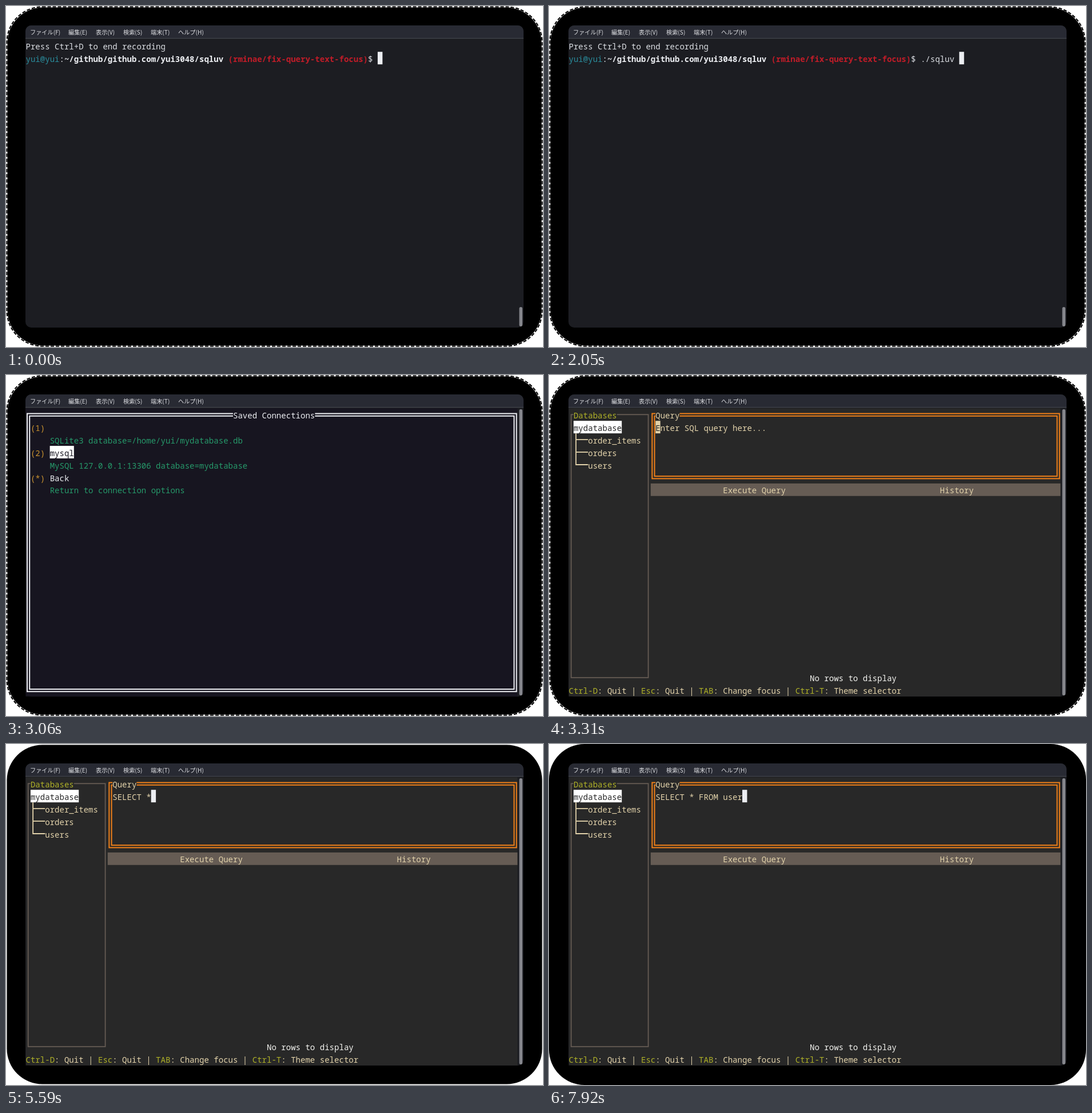
An HTML page with a canvas for the animation above (8 s loop, 939 by 597 pixels).

```html
<!DOCTYPE html>
<html lang="ja">
<head>
<meta charset="utf-8">
<title>Terminal</title>
<style>
html, body { margin: 0; width: 100%; height: 100%; overflow: hidden; background: #fff; }
canvas { display: block; }
</style>
</head>
<body>
<canvas id="stage" width="939" height="597"></canvas>
<script>
const ctx = document.getElementById('stage').getContext('2d');
const LOOP = 8000;
const COL = 8.43, ROW = 21.93, LEFT = 34.5, TOP = 58.3;
const COLS = 102, ROWS = 23;
const SHELL = '#1c1d22', WHITE = '#eceef2', GREEN = '#26996a', AMBER = '#c9922f';
const DARK = '#282828', SAND = '#e2d2aa', BROWN = '#665c54', ORANGE = '#f08019', LIME = '#aeb027';
const MONO = '14.05px "Noto Sans Mono", monospace';

// Moments at which the screen is refreshed
const TICKS = [0, 250, 520, 770, 1020, 1280, 1530, 1790, 2050, 2300, 2550, 2810, 3060, 3310, 3560, 3810,
  4060, 4310, 4570, 4820, 5080, 5330, 5590, 5840, 6100, 6360, 6620, 6880, 7140, 7400, 7660, 7920];
const MENU = [['ファイル(F)', 42], ['編集(E)', 109], ['表示(V)', 157], ['検索(S)', 205], ['端末(T)', 253], ['ヘルプ(H)', 301]];
const QUERY = 'SELECT * FROM user';

const colX = c => LEFT + c * COL;
const rowY = r => TOP + r * ROW;
const midX = c => colX(c + 0.5);
const midY = r => rowY(r + 0.5);

function rect(x, y, w, h, color) {
  ctx.fillStyle = color;
  ctx.fillRect(x, y, w, h);
}

function cells(c, r, n, color) {
  rect(colX(c), rowY(r), n * COL, ROW, color);
}

// Writes on the character grid and returns the next column
function write(c, r, text, color, bold) {
  ctx.font = (bold ? 'bold ' : '') + MONO;
  ctx.fillStyle = color;
  for (const ch of text) {
    if (ch !== ' ') ctx.fillText(ch, colX(c), rowY(r) + 17.6);
    c++;
  }
  return c;
}

function label(c, r, text, color, back) {
  cells(c, r, text.length, back);
  write(c, r, text, color);
}

function line(points, color) {
  ctx.strokeStyle = color;
  ctx.lineWidth = 1.8;
  ctx.beginPath();
  points.forEach(([x, y]) => ctx.lineTo(x, y));
  ctx.stroke();
}

function box(c0, r0, c1, r1, color) {
  ctx.strokeStyle = color;
  ctx.lineWidth = 1.8;
  ctx.strokeRect(midX(c0), midY(r0), midX(c1) - midX(c0), midY(r1) - midY(r0));
}

function doubleBox(c0, r0, c1, r1, color) {
  ctx.strokeStyle = color;
  ctx.lineWidth = 2;
  for (const d of [2.1, -2.1]) {
    const x = midX(c0) + 0.4 - d, y = midY(r0) + 0.4 - d;
    ctx.strokeRect(x, y, (c1 - c0) * COL + 2 * d, (r1 - r0) * ROW + 2 * d);
  }
}

function screen(color) {
  rect(LEFT, TOP, COLS * COL, ROWS * ROW, color);
}

function rounded(x, y, w, h, radius) {
  ctx.beginPath();
  ctx.roundRect(x, y, w, h, radius);
}

// The edge starts ragged, then turns smooth and spreads to the stage border
function backdrop(t) {
  const ragged = t < 5590;
  const inset = ragged ? 2.5 : t < 6880 ? 1.5 : 0;
  rect(0, 0, 939, 597, '#fff');
  ctx.fillStyle = '#000';
  rounded(inset, inset, 939 - 2 * inset, 597 - 2 * inset, 62);
  ctx.fill();
  if (!ragged) return;
  ctx.setLineDash([6, 3]);
  ctx.strokeStyle = '#000';
  ctx.lineWidth = 2;
  rounded(1.5, 1.5, 936, 594, 62);
  ctx.stroke();
  ctx.setLineDash([]);
}

function frameWindow() {
  rounded(34, 34, 871, 529, 10);
  ctx.fillStyle = SHELL;
  ctx.fill();
  rounded(34, 34, 871, 22.5, [10, 10, 0, 0]);
  ctx.fillStyle = '#282a33';
  ctx.fill();
  rect(34, 56, 871, 1.2, '#44464d');
  ctx.font = '10.2px "Noto Sans CJK JP", "Noto Sans CJK", sans-serif';
  ctx.fillStyle = '#dfe0e4';
  for (const [text, x] of MENU) ctx.fillText(text, x, 49.7);
}

function scrollbar(y) {
  rounded(897.5, y, 5.5, 561 - y, 2.7);
  ctx.fillStyle = '#85868c';
  ctx.fill();
}

function shell(command, cursor) {
  write(0, 0, 'Press Ctrl+D to end recording', '#dcdfe4');
  let c = write(0, 1, 'yui@yui', '#2a8c9c');
  c = write(c, 1, ':', WHITE);
  c = write(c, 1, '~/github/github.com/yui3048/sqluv', WHITE, true);
  c = write(c + 1, 1, '(rminae/fix-query-text-focus)', '#c01c28', true);
  c = write(c, 1, '$ ' + command, '#dcdfe4');
  if (cursor) cells(c, 1, 1, WHITE);
  scrollbar(527);
}

function connections(selected) {
  const back = '#171520';
  screen(back);
  doubleBox(0, 0, 101, 22, WHITE);
  label(43, 0, 'Saved Connections', WHITE, back);
  const items = [
    ['(1)', '', 'SQLite3 database=/home/yui/mydatabase.db'],
    ['(2)', 'mysql', 'MySQL 127.0.0.1:13306 database=mydatabase'],
    ['(*)', 'Back', 'Return to connection options']
  ];
  items.forEach(([key, name, info], i) => {
    const r = 1 + 2 * i, on = i === selected;
    write(1, r, key, AMBER);
    if (on) cells(5, r, name.length, '#fff');
    write(5, r, name, on ? back : WHITE);
    write(5, r + 1, info, GREEN);
  });
  scrollbar(60);
}

function tree() {
  box(0, 0, 16, 21, BROWN);
  label(1, 0, 'Databases', LIME, DARK);
  cells(1, 1, 10, '#fff');
  write(1, 1, 'mydatabase', DARK);
  const x = midX(1);
  line([[x, rowY(2)], [x, midY(4)], [colX(4), midY(4)]], SAND);
  ['order_items', 'orders', 'users'].forEach((name, i) => {
    if (i < 2) line([[x, midY(2 + i)], [colX(4), midY(2 + i)]], SAND);
    write(4, 2 + i, name, SAND);
  });
}

function footer() {
  const keys = [['Ctrl-D', 'Quit'], ['Esc', 'Quit'], ['TAB', 'Change focus'], ['Ctrl-T', 'Theme selector']];
  let c = 0;
  keys.forEach(([key, action], i) => {
    c = write(c, 22, key, LIME);
    c = write(c, 22, ': ' + action + (i < 3 ? ' | ' : ''), SAND);
  });
}

function editor(count, cursor) {
  screen(DARK);
  tree();
  doubleBox(17, 0, 101, 5, ORANGE);
  label(18, 0, 'Query', SAND, DARK);
  if (count) {
    const c = write(18, 1, QUERY.slice(0, count), SAND);
    cells(c, 1, 1, WHITE);
  } else {
    write(18, 1, 'Enter SQL query here...', SAND);
    if (cursor) {
      cells(18, 1, 1, SAND);
      write(18, 1, 'E', DARK);
    }
  }
  cells(17, 6, 85, BROWN);
  write(32, 6, 'Execute Query', SAND);
  write(77, 6, 'History', SAND);
  write(50, 21, 'No rows to display', '#f4f4f0');
  footer();
  scrollbar(60);
}

function draw(t) {
  const step = TICKS.findLastIndex(at => at <= t);
  backdrop(t);
  frameWindow();
  if (step < 5) shell('', step % 2 === 0);
  else if (step < 8) shell('./s'.slice(0, step - 4), true);
  else if (step < 10) shell('./sqluv ', step === 8);
  else if (step < 13) connections(step === 12 ? 1 : 0);
  else if (step < 15) editor(0, step === 13);
  else editor(step - 14 + (step > 29 ? 1 : 0));
}

const start = performance.now();
function tick() {
  draw((performance.now() - start) % LOOP);
  requestAnimationFrame(tick);
}
tick();
</script>
</body>
</html>
```
